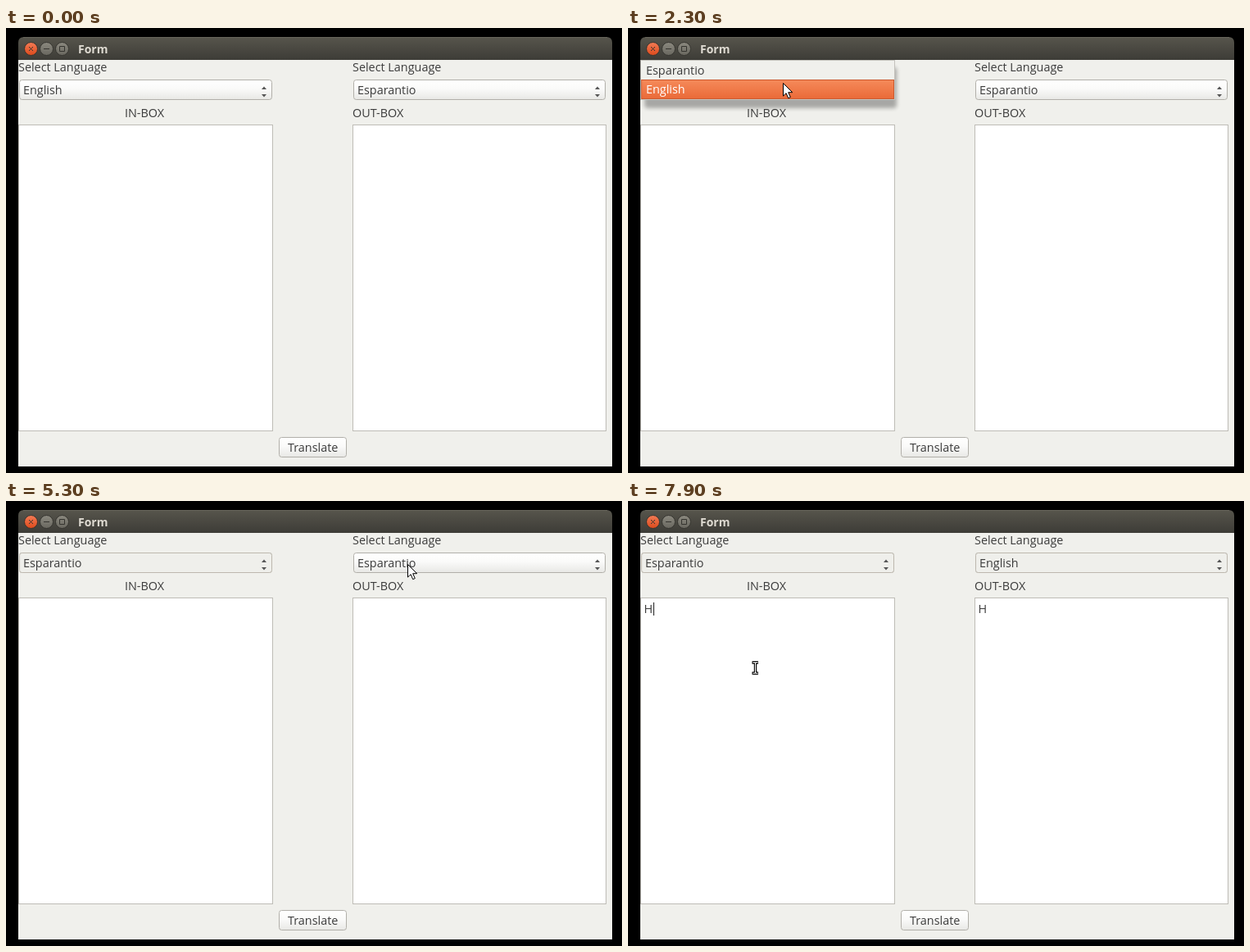
These frames come from a looping animation (752x544 px, 8 s). An HTML page:

```html
<!DOCTYPE html>
<html lang="en">
<head>
<meta charset="utf-8">
<title>Form</title>
<style>
html, body { margin: 0; width: 100%; height: 100%; overflow: hidden; background: #000; }
svg { display: block; width: 752px; height: 544px; }
text { font: 14.4px "Open Sans", "Noto Sans", sans-serif; fill: #3c3c3c; }
.title { font-size: 14px; font-weight: 700; fill: #dfdbd2; }
.hot text { fill: #fff; }
.hot rect { fill: url(#orange); stroke: #cc5a30; }
.menu { fill: #f0f0ec; stroke: #c4c2bc; }
.shadow { fill: #000; opacity: .3; filter: blur(2.5px); }
.field { fill: #fff; stroke: #bebcb6; }
.raised { fill: url(#face); stroke: #b1afa9; }
.flat { fill: #efefeb; stroke: #bdb8ae; }

.anim { animation: 8s step-end infinite; }
.in-menu { animation-name: in-menu; }
.in-top { animation-name: in-top; }
.in-low { animation-name: in-low; }
.in-value { animation-name: in-value; }
.out-menu { animation-name: out-menu; }
.out-top { animation-name: out-top; }
.out-low { animation-name: out-low; }
.out-value { animation-name: out-value; }
.typed { animation-name: typed; }
.caret { animation-name: caret; }
.arrow { animation-name: arrow; }
.beam { animation-name: beam; }
.pointer { animation: pointer 8s infinite; }

@keyframes in-menu { 0%, 35%, 100% { opacity: 0 } 21.25% { opacity: 1 } }
@keyframes in-top { 0% { opacity: 0 } 31.25%, 100% { opacity: 1 } }
@keyframes in-low { 0% { opacity: 1 } 31.25%, 100% { opacity: 0 } }
@keyframes in-value { 0% { opacity: 0 } 35%, 100% { opacity: 1 } }
@keyframes out-menu { 0%, 80%, 100% { opacity: 0 } 67.5% { opacity: 1 } }
@keyframes out-top { 0% { opacity: 0 } 73.75%, 100% { opacity: 1 } }
@keyframes out-low { 0% { opacity: 1 } 73.75%, 100% { opacity: 0 } }
@keyframes out-value { 0% { opacity: 0 } 80%, 100% { opacity: 1 } }
@keyframes typed { 0% { opacity: 0 } 97.5%, 100% { opacity: 1 } }
@keyframes caret {
  0% { opacity: 0; transform: none }
  93.75% { opacity: 1; transform: none }
  97.5%, 100% { opacity: 1; transform: translateX(11px) }
}
@keyframes arrow { 0%, 87.5%, 100% { opacity: 0 } 6.25% { opacity: 1 } }
@keyframes beam { 0% { opacity: 0 } 87.5%, 100% { opacity: 1 } }
/* the screen is sampled ten times a second */
@keyframes pointer {
  0%, 6.25% { transform: translate(286px, 104px); animation-timing-function: steps(2) }
  8.75% { transform: translate(238px, 76px); animation-timing-function: steps(2) }
  11.25%, 13.75% { transform: translate(221px, 91px); animation-timing-function: steps(6) }
  21.25%, 28.75% { transform: translate(189px, 67px); animation-timing-function: steps(3) }
  32.5%, 41.25% { transform: translate(185px, 53px); animation-timing-function: steps(3) }
  45% { transform: translate(336px, 78px); animation-timing-function: steps(9) }
  56.25% { transform: translate(498px, 90px); animation-timing-function: steps(8) }
  66.25%, 71.25% { transform: translate(490px, 77px); animation-timing-function: steps(3) }
  75%, 82.5% { transform: translate(487px, 55px); animation-timing-function: steps(7) }
  91.25%, 100% { transform: translate(155px, 204px) }
}
</style>
</head>
<body>
<svg viewBox="0 0 752 544" xmlns="http://www.w3.org/2000/svg">
  <defs>
    <linearGradient id="bar" x2="0" y2="1">
      <stop stop-color="#57554c"/><stop offset="1" stop-color="#3d3c37"/>
    </linearGradient>
    <linearGradient id="face" x2="0" y2="1">
      <stop stop-color="#fff"/><stop offset=".45" stop-color="#fafaf9"/><stop offset="1" stop-color="#e8e8e5"/>
    </linearGradient>
    <linearGradient id="orange" x2="0" y2="1">
      <stop stop-color="#f58a5a"/><stop offset="1" stop-color="#ea6a38"/>
    </linearGradient>
    <linearGradient id="close" x2="0" y2="1">
      <stop stop-color="#f37b55"/><stop offset="1" stop-color="#dc4a1c"/>
    </linearGradient>
    <linearGradient id="knob" x2="0" y2="1">
      <stop stop-color="#8b897f"/><stop offset="1" stop-color="#69675f"/>
    </linearGradient>
    <path id="spin" d="M312 75h6l-3-3.5zM312 81h6l-3 3.5z" fill="#555"/>
    <g id="panel">
      <rect class="shadow" x="20" y="48" width="308" height="50" rx="4"/>
      <rect class="menu" x="15.5" y="39.5" width="310" height="48"/>
    </g>
  </defs>

  <path d="M15 39V18q0-7 7-7H733q7 0 7 7V39z" fill="url(#bar)"/>
  <path d="M21 11.5H734" stroke="#68665c"/>
  <rect x="15" y="39" width="725" height="497" fill="#f0f0ec"/>
  <g stroke="#35342f">
    <circle cx="30.5" cy="25.5" r="8" fill="url(#close)"/>
    <circle cx="49.5" cy="25.5" r="8" fill="url(#knob)"/>
    <circle cx="68.5" cy="25.5" r="8" fill="url(#knob)"/>
    <path d="M28 23l5 5m0-5l-5 5M46 25.5h7M65.5 22.5h6v6h-6z" fill="none"/>
  </g>
  <text class="title" x="88" y="31">Form</text>

  <text x="15" y="53">Select Language</text>
  <text x="423" y="53">Select Language</text>
  <text x="145" y="109">IN-BOX</text>
  <text x="423" y="109">OUT-BOX</text>
  <rect class="field" x="15.5" y="118.5" width="310" height="374"/>
  <rect class="field" x="423.5" y="118.5" width="309" height="374"/>
  <rect class="raised" x="333.5" y="500.5" width="82" height="24" rx="3"/>
  <text x="344" y="518">Translate</text>

  <rect class="raised" x="16.5" y="63.5" width="308" height="24" rx="3"/>
  <text x="21" y="81">English</text>
  <g class="anim in-value">
    <rect class="flat" x="16.5" y="63.5" width="308" height="24" rx="3"/>
    <text x="21" y="81">Esparantio</text>
  </g>
  <use href="#spin"/>

  <rect class="raised" x="424.5" y="63.5" width="307" height="24" rx="3"/>
  <text x="429" y="81">Esparantio</text>
  <g class="anim out-value">
    <rect class="flat" x="424.5" y="63.5" width="307" height="24" rx="3"/>
    <text x="429" y="81">English</text>
  </g>
  <use href="#spin" x="407"/>

  <g class="anim in-menu">
    <use href="#panel"/>
    <text x="22" y="57">Esparantio</text>
    <text x="22" y="80">English</text>
    <g class="hot anim in-top">
      <rect x="16.5" y="40.5" width="308" height="22"/>
      <text x="22" y="57">Esparantio</text>
    </g>
    <g class="hot anim in-low">
      <rect x="16.5" y="63.5" width="308" height="23"/>
      <text x="22" y="80">English</text>
    </g>
  </g>

  <g class="anim out-menu">
    <use href="#panel" x="407"/>
    <text x="430" y="57">English</text>
    <text x="430" y="80">Esparantio</text>
    <g class="hot anim out-top">
      <rect x="424.5" y="40.5" width="307" height="22"/>
      <text x="430" y="57">English</text>
    </g>
    <g class="hot anim out-low">
      <rect x="424.5" y="63.5" width="307" height="23"/>
      <text x="430" y="80">Esparantio</text>
    </g>
  </g>

  <g class="anim typed">
    <text x="19.5" y="137">H</text>
    <text x="427.5" y="137">H</text>
  </g>
  <path class="anim caret" d="M20.5 124v16" stroke="#222"/>

  <g class="pointer">
    <path class="anim arrow" d="M.5 .5v15.6l3.6-3.4 2.6 6 2.6-1.1-2.6-5.9h5z" fill="#fff" stroke="#000"/>
    <g class="anim beam" fill="none">
      <path d="M-3.5-6.5h7.5M-3.5 6.5h7.5M.5-7V7" stroke="#000" stroke-width="3.4"/>
      <path d="M-2.5-6.5h6M-2.5 6.5h6M.5-6V6" stroke="#fff" stroke-width="1.1"/>
    </g>
  </g>
</svg>
</body>
</html>
```
